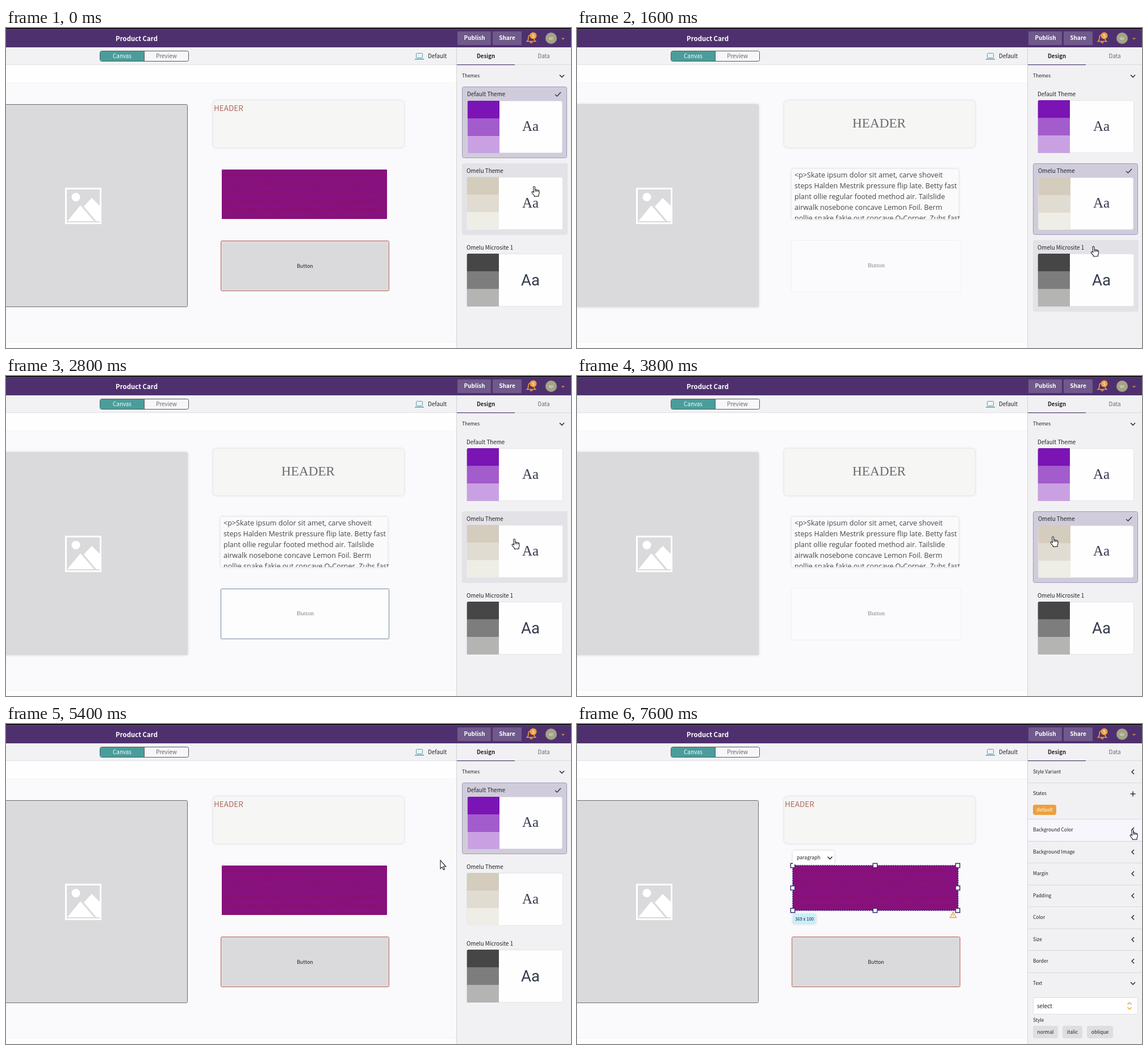
An HTML page with a canvas that plays this animation: 995x563 px, repeating every 8 s.

```html
<!DOCTYPE html>
<html lang="en">
<head>
<meta charset="utf-8">
<title>Theme switcher</title>
<style>
html, body { margin: 0; width: 100%; height: 100%; overflow: hidden; background: #fafafc; }
canvas { display: block; width: 995px; height: 563px; }
</style>
</head>
<body>
<canvas id="stage"></canvas>
<script>
const LOOP = 8000, STEP = 200;
const canvas = document.getElementById('stage');
const ratio = window.devicePixelRatio || 1;
canvas.width = Math.round(995 * ratio);
canvas.height = Math.round(563 * ratio);
const c = canvas.getContext('2d');

const INK = '#222226', PURPLE = '#4f306f', ORANGE = '#eda03f', GREY = '#dadadc';
const UI = '"Noto Sans CJK SC", "Noto Sans CJK JP", "Noto Sans CJK", "Noto Sans", sans-serif';
const SERIF = '"Liberation Serif", serif';
const UI_SCALE = 0.895;

const themes = [
  { name: 'Default Theme', y: 103, swatches: ['#7a14b4', '#a35ccb', '#c9a1e3'], font: SERIF, size: 25 },
  { name: 'Omelu Theme', y: 238, swatches: ['#d4ccbc', '#e1dcd2', '#eeede6'], font: SERIF, size: 25 },
  { name: 'Omelu Microsite 1', y: 373, swatches: ['#464646', '#7d7d7d', '#b4b4b3'], font: 'Roboto, sans-serif', size: 27.6 }
];

// Each switch: content changes, card becomes selected, saving ends.
const switches = [
  { theme: 0, at: -9000, select: -9000, done: -8000, angle: 0 },
  { theme: 1, at: 400, select: 600, done: 1200, angle: 45 },
  { theme: 2, at: 1800, select: 2000, done: 2400, angle: 160 },
  { theme: 1, at: 2800, select: 3000, done: 3600, angle: 45 },
  { theme: 0, at: 4200, select: 4200, done: 5000, angle: 90 }
];
const INSPECT_AT = 5600;

const pointerPath = [
  [0, 930, 279], [200, 930, 279], [400, 902, 282], [1200, 902, 284], [1800, 913, 435],
  [2400, 913, 435], [2600, 899, 310], [2800, 895, 287], [3000, 895, 287], [3200, 780, 400],
  [3400, 640, 330], [3600, 551, 160], [3800, 838, 283], [4000, 838, 283], [4200, 897, 190],
  [5000, 885, 205], [5200, 885, 205], [5400, 765, 240], [5600, 668, 269], [6400, 668, 269],
  [7400, 978, 186], [8000, 978, 186]
];

const largeCopy = [
  '<p>Skate ipsum dolor sit amet, carve shoveit',
  'steps Halden Mestrik pressure flip late. Betty fast',
  'plant ollie regular footed method air. Tailslide',
  'airwalk nosebone concave Lemon Foil. Berm',
  'nollie snake fakie out concave Q-Corner. Zubs fast'
];
const smallCopy = [
  '<p>Skate ipsum dolor sit amet, carve shoveit steps Halden Mestrik',
  'pressure flip late. Betty fast plant ollie regular footed method air.',
  'Tailslide airwalk nosebone concave Lemon Foil. Berm nollie snake',
  'fakie out concave Q-Corner. Zubs fast plant blunt pogo yeah layback.',
  'Thunder steps trucks rock and roll Lemon Foil vert. Mini ramp speed',
  'wobbles bruised heel bigspin wax The Marvuns. Pop shove-it Curbs'
];

const rows = [
  ['Style Variant', 65, 38], ['States', 103, 64], ['Background Color', 167, 38],
  ['Background Image', 206, 38], ['Margin', 244, 38], ['Padding', 283, 38],
  ['Color', 321, 38], ['Size', 360, 38], ['Border', 398, 38], ['Text', 437, 38]
];

function rect(x, y, w, h, fill, r = 0, stroke) {
  c.beginPath();
  c.roundRect(x, y, w, h, r);
  if (fill) { c.fillStyle = fill; c.fill(); }
  if (stroke) { c.strokeStyle = stroke; c.lineWidth = 1; c.stroke(); }
}

function softRect(x, y, w, h, fill, r) {
  c.save();
  c.shadowColor = 'rgba(0,0,0,.16)';
  c.shadowBlur = 4 * ratio;
  rect(x, y, w, h, fill, r);
  c.restore();
}

function circle(x, y, r, fill) {
  c.beginPath();
  c.arc(x, y, r, 0, 7);
  c.fillStyle = fill;
  c.fill();
}

function line(points, color, width = 1.5, close) {
  c.beginPath();
  points.forEach(([x, y]) => c.lineTo(x, y));
  if (close) c.closePath();
  c.strokeStyle = color;
  c.lineWidth = width;
  c.stroke();
}

function shape(points, fill) {
  c.beginPath();
  points.forEach(([x, y]) => c.lineTo(x, y));
  c.fillStyle = fill;
  c.fill();
}

// y is the visual middle of the capitals.
function text(s, x, y, size, { color = INK, bold, align = 'left', font = UI } = {}) {
  const px = font === UI ? size * UI_SCALE : size;
  c.font = `${bold ? 'bold ' : ''}${px}px ${font}`;
  c.textAlign = align;
  c.fillStyle = color;
  c.fillText(s, x, y + size * 0.34);
}

function clipped(x, y, w, h, draw) {
  c.save();
  c.beginPath();
  c.rect(x, y, w, h);
  c.clip();
  draw();
  c.restore();
}

function drawChrome() {
  rect(0, 0, 995, 563, '#fafafc');
  rect(0, 65, 793, 31, '#fefefe');
  rect(0, 96, 793, 1, '#f4f4f6');
  rect(0, 553, 793, 10, '#fdfdfd');
  rect(0, 552, 793, 1, '#f3f3f5');

  rect(0, 0, 995, 34, PURPLE);
  rect(0, 0, 995, 2, '#141018');
  rect(0, 2, 995, 1, '#6a5285');
  text('Product Card', 193, 18.5, 12.8, { color: '#fff', bold: true });
  rect(795, 6, 59, 24, '#6f5a8b', 1);
  rect(857, 6, 51, 24, '#6f5a8b', 1);
  text('Publish', 825, 17.5, 11.2, { color: '#fff', bold: true, align: 'center' });
  text('Share', 882.5, 17.5, 11.2, { color: '#fff', bold: true, align: 'center' });

  c.strokeStyle = ORANGE;
  c.lineWidth = 1.6;
  c.stroke(new Path2D('M917.5 23.5H932.5Q930 21.5 930 17Q930 12 925 12Q920 12 920 17Q920 21.5 917.5 23.5ZM923 24.5Q925 28 927 24.5'));
  circle(928.5, 13.5, 6, ORANGE);
  text('5', 928.5, 13.5, 9, { color: '#fff', align: 'center' });
  circle(960, 18, 10, '#a3a387');
  text('WI', 960, 18, 7.5, { color: '#eeeede', align: 'center' });
  line([[978.8, 17.5], [981, 19.7], [983.2, 17.5]], ORANGE, 1.2);

  rect(0, 34, 995, 31, '#f2f2f4');
  rect(0, 64, 793, 1, '#e2e2e5');
  rect(165.5, 40.5, 156, 18, '#f7f7f9', 3, '#555a60');
  rect(166, 41, 77, 17, '#4a9d9b', [2, 0, 0, 2]);
  rect(243, 41, 1, 17, '#555a60');
  text('Canvas', 204.5, 49.5, 11, { color: '#fff', align: 'center' });
  text('Preview', 282.5, 49.5, 11, { color: '#666', align: 'center' });
  rect(722.5, 44.5, 11, 8, null, 1, '#4b9fb0');
  rect(720, 54, 16, 1.5, '#4b9fb0');
  text('Default', 743, 49.5, 11);
}

function drawImageBox(bordered) {
  if (bordered) rect(-5.5, 134.5, 325, 356, GREY, 2, '#6c6c70');
  else softRect(-6, 134, 326, 357, GREY, 2);
  c.strokeStyle = '#fff';
  c.lineWidth = 3;
  c.strokeRect(105.5, 282.5, 61, 61);
  circle(123, 297.5, 7.5, '#fff');
  shape([[108, 340], [131, 312], [155, 340]], '#fff');
  shape([[137, 314], [151, 299], [165, 313], [165, 340], [159, 340]], '#fff');
}

function drawCopy(lines, x, y, step, size, style) {
  lines.forEach((s, i) => text(s, x, y + i * step, size, style));
}

function drawContent(theme, fresh, inspecting) {
  const isDefault = theme === 0;
  drawImageBox(isDefault);
  softRect(365, 128, 336, 82, '#f6f6f5', 5);

  if (isDefault) {
    const h = inspecting ? 79 : 87;
    text('HEADER', 366, 140.5, 15.1, { color: '#b0685f' });
    rect(380, 249, 291, h, '#86117f');
    clipped(380, 249, 291, h, () => drawCopy(smallCopy, 381, 258, 15.1, 10, { color: '#901064' }));
    rect(378.5, 374.5, 296, 88, GREY, 2, '#b9655c');
    text('Button', 526.5, 419, 10, { align: 'center' });
    return;
  }
  softRect(378, 248, 294, 88, '#fafafb', 3);
  if (theme === 1) {
    text('HEADER', 532, 167.5, 23.2, { color: '#6b6b70', align: 'center', font: SERIF });
    clipped(378, 246, 296, 90, () =>
      drawCopy(largeCopy, 383, 259, 18.85, 12.55, { color: '#47474b', font: '"Open Sans", sans-serif' }));
    if (fresh) rect(378.5, 374.5, 296, 88, '#fdfdfe', 1, '#76889c');
    else rect(377.5, 373.5, 299, 91, '#fbfbfd', 2, '#f0f0f2');
    text('Button', 527, 417.5, 11, { color: '#85858a', align: 'center', font: SERIF });
  } else {
    text('HEADER', 532, 170, 15.1, { color: '#111', align: 'center' });
    clipped(378, 246, 296, 93, () => drawCopy(smallCopy, 380.5, 260, 15.15, 10));
    softRect(378, 375, 297, 88, GREY, 2);
    text('Button', 526.5, 419, 10, { align: 'center' });
  }
}

function chevron(x, y, down) {
  line(down ? [[x - 4, y - 2], [x, y + 2], [x + 4, y - 2]]
            : [[x + 2, y - 4], [x - 2, y], [x + 2, y + 4]], '#333338', 1.6);
}

function drawPanelFrame() {
  rect(793, 34, 202, 529, '#f1f1f3');
  rect(793, 34, 1, 529, '#d3d3d7');
  rect(794, 64, 201, 1, '#d9d9dd');
  rect(794, 64, 102, 1.3, '#55407a');
  text('Design', 845, 49.5, 10.8, { bold: true, align: 'center' });
  text('Data', 947, 49.5, 11, { color: '#66666b', align: 'center' });
}

function drawThemeCard({ name, y, swatches, font, size }, selected, saving, hovered) {
  const d = selected ? 1 : 0;
  if (selected) rect(803.5, y + 0.5, 184, 125, saving ? '#e1e0e6' : '#d0ccdb', 3, saving ? '#85829a' : '#a29bb8');
  else if (hovered) rect(803, y, 186, 126, '#e3e2e7', 3);
  text(name, 811 + d, y + 13 + d * 0.7, 11);
  if (selected) {
    line([[967, y + 14], [970.5, y + 17], [977, y + 10]], saving ? '#cfced6' : '#39394a', 1.6);
  }
  const top = y + 24 + d, x = 811.5 + d, w = 169 - 2 * d, h = 93 - d;
  rect(x, top + 0.5, w, h - 1, '#fefefe', 3, '#e4e4e8');
  clipped(x, top, 56.5, h, () =>
    swatches.forEach((color, i) => rect(x, top + i * 31, 57, 31, color, i ? 0 : [3, 0, 0, 0])));
  text('Aa', 923.5, y + 69 + (size > 26 ? 2 : 0), size, { color: '#363c4e', align: 'center', font });
}

function drawThemes(t, current, pointer) {
  text('Themes', 803, 84, 9.4);
  chevron(979, 84.5, true);
  themes.forEach((theme, i) => {
    const hovered = pointer.x > 803 && pointer.x < 989 && pointer.y > theme.y && pointer.y < theme.y + 126;
    const selected = i === current.theme && t >= current.select;
    drawThemeCard(theme, selected, t < current.done, hovered);
  });
}

function drawProperties(pointer) {
  rows.forEach(([name, y, h], i) => {
    if (pointer.x > 794 && pointer.y > y && pointer.y < y + h) rect(794, y, 201, h, '#f7f6fc');
    if (i) rect(794, y, 201, 1, '#d9d9dd');
    text(name, 803, y + 19.3, 9.4);
    if (name === 'States') {
      line([[974.5, y + 20], [983.5, y + 20]], '#333338');
      line([[979, y + 15.5], [979, y + 24.5]], '#333338');
    } else chevron(979, y + 19.3, name === 'Text');
  });
  rect(803, 142, 41, 18, ORANGE, 4);
  text('default', 823.5, 151, 9.6, { color: '#fff', align: 'center' });
  rect(803.5, 481.5, 184, 29, '#fff', 1, '#dedee2');
  text('select', 810, 496.5, 11);
  line([[969.5, 493.5], [973, 490], [976.5, 493.5]], ORANGE);
  line([[969.5, 498.5], [973, 502], [976.5, 498.5]], ORANGE);
  text('Style', 803, 520.5, 9.4);
  [['normal', 803, 44], ['italic', 855, 35], ['oblique', 898, 46]].forEach(([s, x, w]) => {
    rect(x, 531, w, 22, '#dedee1', 4);
    text(s, x + w / 2, 541.5, 9.6, { align: 'center' });
  });
}

function drawSelection() {
  c.setLineDash([2.5, 1.5]);
  line([[380, 249], [671, 249], [671, 328], [380, 328]], '#44247c', 1.6, true);
  c.setLineDash([]);
  [249, 288.5, 328].forEach((y, row) => [380, 525, 670.5].forEach((x, col) => {
    if (row === 1 && col === 1) return;
    c.lineWidth = 1.5;
    c.strokeStyle = '#3d2b73';
    c.fillStyle = '#fff';
    c.fillRect(x - 4, y - 4, 8, 8);
    c.strokeRect(x - 3.7, y - 3.7, 7.4, 7.4);
  }));
  softRect(380, 223, 73, 24, '#fff', 2);
  text('paragraph', 387, 235, 9.7);
  chevron(445.5, 235.5, true);
  softRect(380, 334, 41, 18, '#c8effb', 3);
  text('369 x 100', 400.5, 343, 8.6, { align: 'center' });
  line([[662.5, 330.5], [668, 340.5], [657, 340.5]], ORANGE, 1.4, true);
  rect(662, 334, 1.2, 3.5, ORANGE);
  rect(662, 338.4, 1.2, 1.1, ORANGE);
}

function drawSpinner(degrees) {
  c.strokeStyle = '#ddd6e6';
  c.lineWidth = 1.3;
  [0, 180].forEach(turn => {
    const mid = (degrees + turn) * Math.PI / 180;
    c.beginPath();
    c.arc(360, 18, 8, mid - 0.78, mid + 0.78);
    c.stroke();
  });
}

const hand = new Path2D('M-1.4 10V1Q-1.4 -.3 0 -.3Q1.4 -.3 1.4 1V6Q2.8 5 3.8 6.5Q5.3 5.6 6.3 7.2Q8 6.7 8.2 8.5V12Q8 14 6.8 15.2V17.5H-.8V15.8Q-3 13.5 -4.6 10.6Q-5 9 -3.8 8.6Q-2.6 8.4 -1.4 10ZM1.4 6V9.3M3.8 6.5V9.5M6.3 7.2V9.8');
const arrow = new Path2D('M0 0V14.5L3.2 11.6L5.3 16.6L7.5 15.7L5.4 10.8H9.8Z');

function drawPointer({ x, y }, isHand) {
  const icon = isHand ? hand : arrow;
  c.save();
  c.translate(x, y);
  if (isHand) c.rotate(-0.08);
  c.fillStyle = '#fff';
  c.fill(icon);
  c.strokeStyle = '#1c1c24';
  c.lineWidth = 1.1;
  c.stroke(icon);
  c.restore();
}

function pointerAt(t) {
  const next = pointerPath.findIndex(p => p[0] > t);
  const [t0, x0, y0] = pointerPath[next - 1], [t1, x1, y1] = pointerPath[next];
  const k = (t - t0) / (t1 - t0);
  return { x: x0 + (x1 - x0) * k, y: y0 + (y1 - y0) * k };
}

function render(t) {
  const current = switches.filter(s => s.at <= t).pop();
  const inspecting = t >= INSPECT_AT;
  const pointer = pointerAt(t);
  c.setTransform(ratio, 0, 0, ratio, 0, 0);
  drawChrome();
  drawContent(current.theme, t < current.select, inspecting);
  drawPanelFrame();
  if (inspecting) {
    drawProperties(pointer);
    drawSelection();
  } else drawThemes(t, current, pointer);
  if (t >= current.select && t < current.done) {
    drawSpinner(current.angle + (t - current.select) * 0.3);
  }
  drawPointer(pointer, pointer.x > 803);
}

const start = performance.now();
function tick() {
  const t = (performance.now() - start) % LOOP;
  render(Math.floor(t / STEP) * STEP);
  requestAnimationFrame(tick);
}
tick();
</script>
</body>
</html>
```
